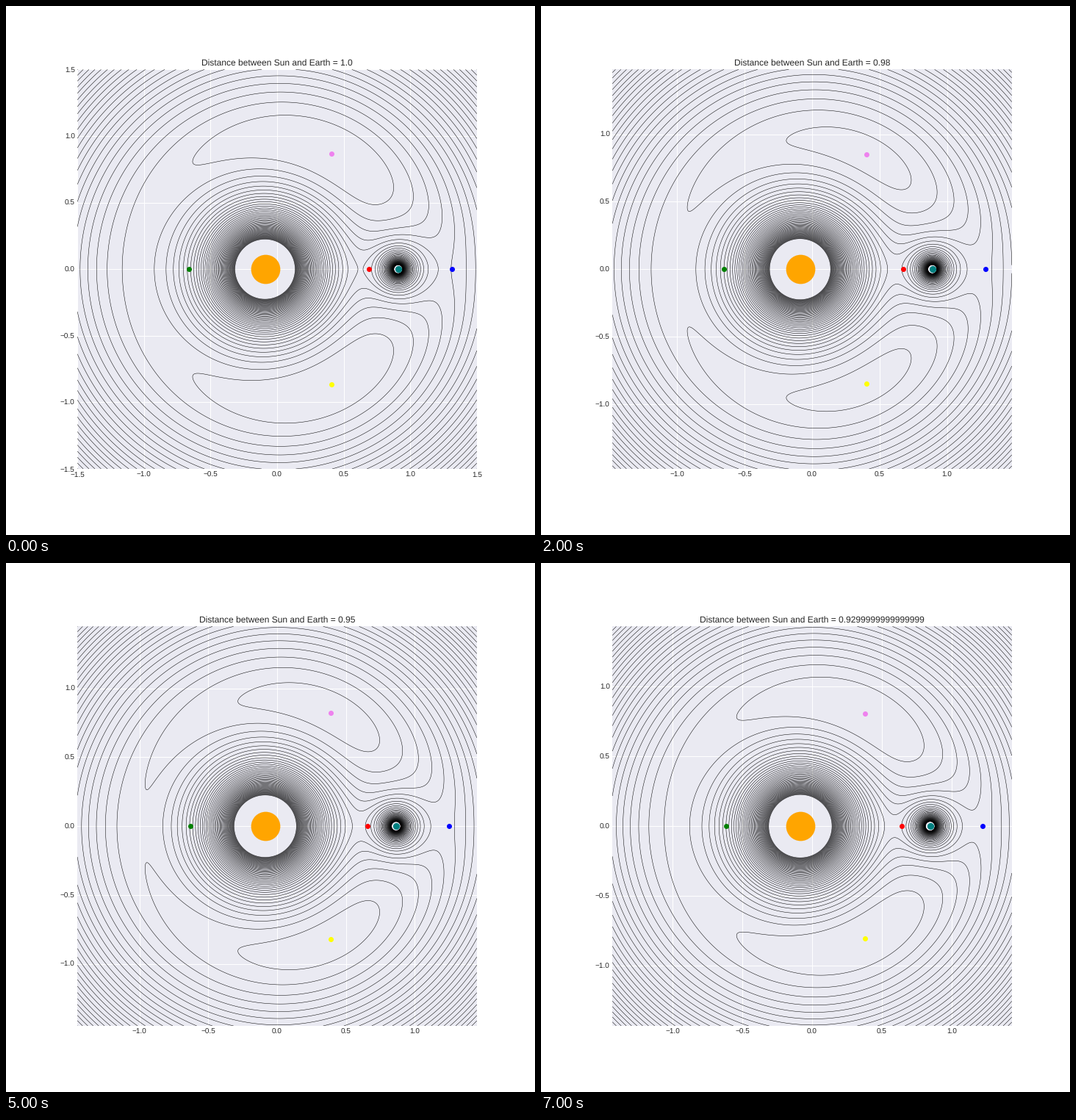
A matplotlib script that plays this animation: 720 px wide and 720 px high, repeating every 8000 ms.

```python
import numpy as np
import matplotlib.pyplot as plt
from matplotlib.animation import FuncAnimation
from matplotlib.ticker import MultipleLocator

plt.rcParams["font.family"] = "Liberation Sans"
plt.rcParams["text.hinting"] = "none"

M1, M2 = 10, 1
ALPHA = M2 / (M1 + M2)
HILL = (ALPHA / 3) ** (1 / 3)
LEVELS = np.sort(-16.648 - 0.6035 * np.arange(49))
FRAMES, INTERVAL = 8, 1000
INK = "0.15"

# Lagrange points and their colours, in units of the separation
POINTS = [
    (1 - HILL, 0, "red"),
    (1 + HILL, 0, "blue"),
    (-0.6645, 0, "green"),
    (0.5 - ALPHA, np.sqrt(3) / 2, "violet"),
    (0.5 - ALPHA, -np.sqrt(3) / 2, "yellow"),
]

fig = plt.figure(figsize=(10, 10), dpi=72, facecolor="white")
ax = fig.add_axes([0.135, 0.125, 0.755, 0.755])


def potential(x, y, d):
    """Effective potential in the frame rotating with both bodies."""
    r1 = np.hypot(x + ALPHA * d, y)
    r2 = np.hypot(x - (1 - ALPHA) * d, y)
    omega2 = (M1 + M2) / d**3
    return -M1 / r1 - M2 / r2 - omega2 * (x**2 + y**2) / 2


def dot(x, y, color, size=7):
    ax.scatter(x, y, s=size**2, color=color, lw=0, zorder=3)


def style(limit):
    ax.set_facecolor("#EAEAF2")
    ax.set_axisbelow(True)
    ax.grid(color="white", lw=1)
    ax.spines[:].set_visible(False)
    ax.tick_params(length=0, pad=3.5, labelsize=10, labelcolor=INK)
    ax.set(xlim=(-limit, limit), ylim=(-limit, limit))
    for axis in (ax.xaxis, ax.yaxis):
        axis.set_major_locator(MultipleLocator(0.5))


def draw(i):
    d = 1 - 0.01 * i
    limit = d + 0.5
    ax.clear()
    style(limit)

    span = np.linspace(-limit, limit, 600)
    x, y = np.meshgrid(span, span)
    ax.contour(x, y, potential(x, y, d), LEVELS, colors="black",
               linewidths=0.5, linestyles="solid")

    dot(-ALPHA * d, 0, "orange", 39.7)
    dot((1 - ALPHA) * d, 0, "teal", 9.2)
    for px, py, color in POINTS:
        dot(px * d, py * d, color)
    ax.set_title(f"Distance between Sun and Earth = {d}",
                 fontsize=12, color=INK, pad=6)


anim = FuncAnimation(fig, draw, frames=FRAMES, init_func=lambda: None,
                     interval=INTERVAL, repeat=True, repeat_delay=0)
plt.show()
```
